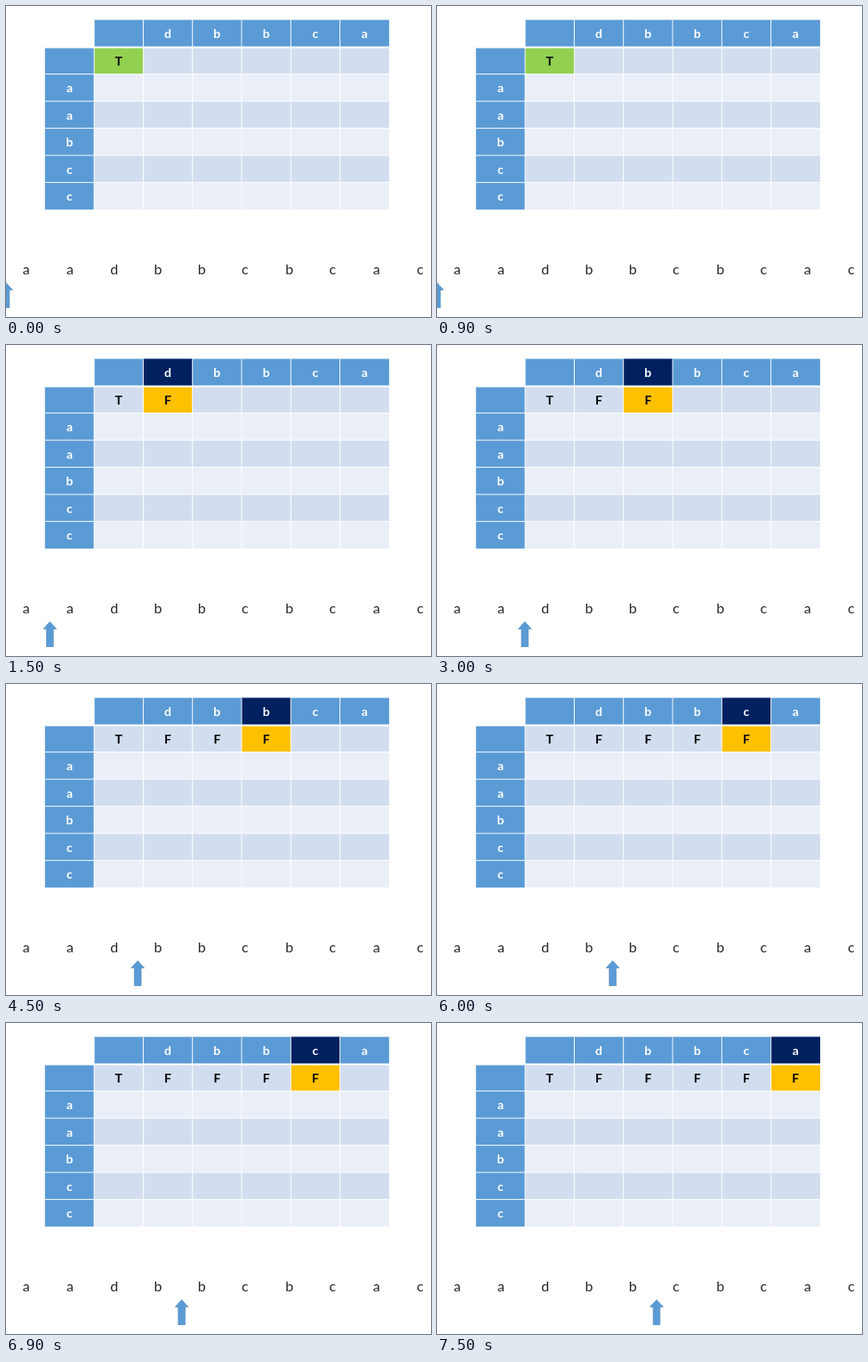
Write an HTML page that moves like this. It is 478 by 350 pixels and loops after 8000 ms.

```html
<!DOCTYPE html>
<html lang="en">
<head>
<meta charset="utf-8">
<title>Interleaving table</title>
<style>
  @property --step { syntax: "<integer>"; inherits: true; initial-value: 0; }
  html, body { margin: 0; width: 100%; height: 100%; overflow: hidden; background: #fff; }
  svg { display: block; width: 478px; height: 350px; animation: advance 8s step-end infinite; }
  text { font-family: Lato, "Open Sans", sans-serif; }
  .table text { font-size: 14px; font-weight: 700; text-anchor: middle; }
  .word text { font-size: 16px; fill: #262626; }
  .label { fill: #fff; }
  .head { fill: #5b9bd5; }
  .odd { fill: #d2deef; }
  .even { fill: #eaeff7; }
  .start { fill: #92d050; opacity: calc(1 - var(--step)); }
  .column { opacity: var(--step); transform: translateX(calc(var(--step) * 55.3px)); }
  .active-head { fill: #002060; }
  .active-cell { fill: #ffc000; }
  .result { opacity: calc(var(--step) - var(--i) + 1); }
  .lines { stroke: #fff; fill: none; }
  .arrow { fill: #5b9bd5; stroke: #4b87bd; stroke-width: .7; transform: translateX(calc(var(--step) * 49.4px - 25.7px)); }
  @keyframes advance {
    0% { --step: 0; }
    18.75% { --step: 1; }
    37.5% { --step: 2; }
    56.25% { --step: 3; }
    75% { --step: 4; }
    93.75%, 100% { --step: 5; }
  }
</style>
</head>
<body>
<svg viewBox="0 0 478 350">
  <g class="table"></g>
  <g class="word"></g>
  <path class="arrow" d="M25.7 311.5 L33 319.5 H29.5 V339.5 H21.9 V319.5 H18.4 Z"/>
</svg>
<script>
  const LEFT = 43.8, TOP = 15.6, W = 55.3, H = 30.5;
  const columns = "dbbca", rows = "aabcc", word = "aadbbcbcac";
  const table = document.querySelector(".table");
  const x = col => LEFT + col * W;
  const y = row => TOP + row * H;

  function add(parent, tag, attrs, content = "") {
    const node = document.createElementNS("http://www.w3.org/2000/svg", tag);
    for (const key in attrs) node.setAttribute(key, attrs[key]);
    node.textContent = content;
    return parent.appendChild(node);
  }
  const cell = (parent, col, row, name) =>
    add(parent, "rect", { x: x(col), y: y(row), width: W, height: H, class: name });
  const letter = (col, row, content, attrs) =>
    add(table, "text", { x: x(col) + W / 2, y: y(row) + 20.4, ...attrs }, content);

  for (let row = 0; row < 7; row++) {
    for (let col = 0; col < 7; col++) {
      if (row + col === 0) continue;
      cell(table, col, row, row * col === 0 ? "head" : row % 2 ? "odd" : "even");
    }
  }

  // The highlighted column is drawn at column 1 and shifted by the step.
  cell(table, 1, 1, "start");
  const column = add(table, "g", { class: "column" });
  cell(column, 1, 0, "active-head");
  cell(column, 1, 1, "active-cell");

  let grid = "";
  for (let i = 1; i < 7; i++) {
    grid += `M${x(i)} ${TOP}V${y(7)}`;
    if (i > 1) grid += `M${LEFT} ${y(i)}H${x(7)}`;
  }
  add(table, "path", { d: grid, class: "lines", "stroke-width": 0.9 });
  add(table, "path", { d: `M${LEFT} ${y(1) + 0.4}H${x(7)}`, class: "lines", "stroke-width": 2 });

  [...columns].forEach((char, i) => {
    letter(i + 2, 0, char, { class: "label" });
    letter(i + 2, 1, "F", { class: "result", style: `--i:${i + 1}` });
  });
  [...rows].forEach((char, i) => letter(0, i + 2, char, { class: "label" }));
  letter(1, 1, "T");

  [...word].forEach((char, i) =>
    add(document.querySelector(".word"), "text", { x: 18.8 + i * 49.25, y: 301.5 }, char));
</script>
</body>
</html>
```
